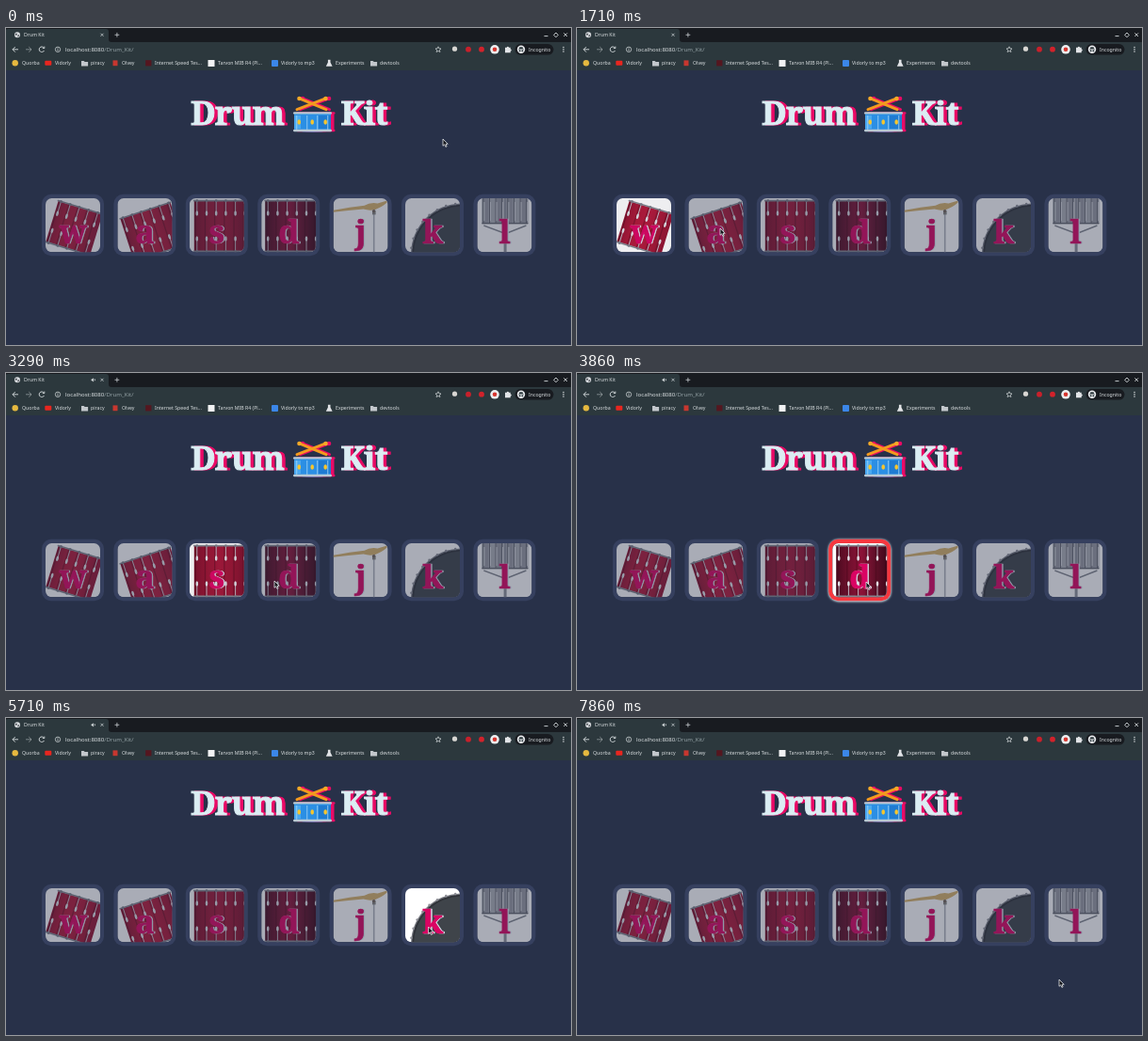
Animation of 600 by 337 pixels, one loop 8 s. Source, as an HTML page:

```html
<!DOCTYPE html>
<html lang="en">
<head>
<meta charset="utf-8">
<title>Drum Kit</title>
<style>
  html, body { margin: 0; width: 100%; height: 100%; overflow: hidden; background: #283149; }
  svg { display: block; width: 100%; height: 100%; }
  .ui { font: 5.2px "Noto Sans", sans-serif; fill: #d9dee0; }
  .slab { font: bold 35px "Noto Serif", serif; stroke-linejoin: miter; }
  .title { letter-spacing: -1px; text-anchor: middle; stroke-width: 1; }
  .key { font-size: 34.5px; text-anchor: middle; stroke-width: .7; }
  .line { fill: none; stroke: #d9dee0; stroke-width: .9; }
</style>
</head>
<body>
<svg id="stage" viewBox="0 0 600 337" xmlns="http://www.w3.org/2000/svg"></svg>
<script>
const LOOP = 8000, STEP = 1000 / 7;
const PITCH = 76.4;
const BAR = '#2c383d', STRIP = '#181b20';
const stage = document.getElementById('stage');

const rect = (x, y, w, h, fill, r = 0, more = '') =>
  `<rect x="${x}" y="${y}" width="${w}" height="${h}" rx="${r}" fill="${fill}" ${more}/>`;
const path = (d, fill, more = '') => `<path d="${d}" fill="${fill}" ${more}/>`;
const line = (d, more = '') => `<path class="line" d="${d}" ${more}/>`;
const dot = (x, y, r, fill) => `<circle cx="${x}" cy="${y}" r="${r}" fill="${fill}"/>`;
const label = (x, y, s, more = '') => `<text class="ui" x="${x}" y="${y}" ${more}>${s}</text>`;
const group = (inner, more = '') => `<g ${more}>${inner}</g>`;
const repeat = (n, fn) => Array.from({ length: n }, (_, i) => fn(i)).join('');

const folder = x => path(`M${x - 3.5} 35h2.7l1 1h3.4v4.4h-7.1z`, '#c3c7cc');
const globe = (x, y) => dot(x, y, 3, '#d9dce0') +
  path(`M${x - 2} ${y - 1.6}l2 .3-.6 1.5-1.6.2zM${x + .5} ${y + .3}l1.6-.4-.5 1.8-1.4.3z`, '#4a4e54');

function browser() {
  const tabs = rect(0, 0, 600, 16, STRIP) +
    path('M0 15V2Q0 1 2 1H106Q109 1 109 4V12Q109 15 112 15z', BAR) +
    globe(12, 7.3) + label(19, 9.2, 'Drum Kit') +
    line('M100.5 5.8l3 3m0-3l-3 3M115.5 7.3h4.8m-2.4-2.4v4.8', 'opacity=".8"') +
    line('M571.5 8.6h4M592.4 5.4l3.6 3.6m0-3.6l-3.6 3.6') +
    line('M584 5l2.4 2.4-2.4 2.4-2.4-2.4z') +
    group(path('M90.6 6.4h1l1.3-1.2v4.2l-1.3-1.2h-1z', '#d9dee0') +
      line('M94 6.3q1 1 0 2', 'stroke-width=".6"'), 'id="sound"');

  const bar = rect(0, 15, 600, 30, BAR) +
    line('M13 22.8H7m2.8-2.8L7 22.8l2.8 2.8') +
    line('M21 22.8h6m-2.8-2.8l2.8 2.8-2.8 2.8', 'opacity=".5"') +
    line('M40.2 21a2.8 2.8 0 1 0 .3 3M40.8 19.6v2h-2') +
    `<circle class="line" cx="55" cy="22.8" r="2.7" style="stroke-width:.7"/>` +
    line('M55 22.5v1.8M55 20.9v.7', 'stroke-width=".7"') +
    `<text class="ui" x="63" y="24.9" style="font-size:6.1px">localhost:8080<tspan fill="#93a0a4">/Drum_Kit/</tspan></text>` +
    path('M459 19.8l.9 2 2.1.2-1.6 1.4.5 2.1-1.9-1.1-1.9 1.1.5-2.1-1.6-1.4 2.1-.2z', 'none',
      'stroke="#d9dee0" stroke-width=".7"') +
    dot(476.5, 22.2, 2.6, '#d8d6d3') + dot(491, 22.7, 2.9, '#c9202b') + dot(505, 22.7, 2.9, '#d3222b') +
    dot(519, 22.8, 4.8, '#eceff1') + dot(519, 22.8, 2.3, '#d6362f') +
    path('M530 20.8h1.8a1.1 1.1 0 0 1 2.2 0h1.7v1.7a1.1 1.1 0 0 1 0 2.2v1.5h-5.7z', '#e2e4e7') +
    rect(540.5, 17, 41, 11.6, STRIP, 5.8) + dot(547, 22.8, 4.2, '#e8eaed') +
    path('M544 22.4h6v.6h-6zM545.4 20.2h3.2l.5 1.8h-4.2z', BAR) +
    dot(545.6, 24.3, 1, BAR) + dot(548.4, 24.3, 1, BAR) +
    label(555, 24.7, 'Incognito') +
    repeat(3, i => dot(592, 20.6 + i * 2.2, .75, '#d9dee0'));

  const marks = [[17, 'Quorba'], [52, 'Vidorly'], [90, 'piracy'], [123, 'Olvey'],
    [158, 'Internet Speed Tes...'], [225, 'Tarvon MIB R4 (Pl...'],
    [292, 'Vidorly to mp3'], [350, 'Experiments'], [397, 'devtools']]
    .map(([x, s]) => label(x, 39.2, s)).join('');
  const icons = dot(9.7, 37.3, 3.2, '#e6b93f') + rect(41.3, 34.8, 7, 5, '#e8261f', 1) +
    folder(83.5) + rect(113.5, 34.4, 5, 5.8, '#c8372f') + rect(148.2, 34.2, 6.2, 6.2, '#55161f') +
    rect(214.5, 34, 7, 7, '#f1f2f3') + rect(282, 34, 7, 7, '#3b86e8', 1) +
    path('M341.9 33.8h2.6v2.6l2.1 4.4h-6.8l2.1-4.4z', '#e2e4e7') + folder(390.5);
  return tabs + bar + marks + icons;
}

// Drum with crossed sticks; a single tint gives its flat shadow.
function drumSign(tint) {
  const c = col => tint || col;
  const stick = (x1, x2) =>
    `<path d="M${x1} 74.8L${x2} 86.6" stroke="${c('#f39a1f')}" stroke-width="3" stroke-linecap="round"/>` +
    dot(x1, 75, 2.3, c('#f7a928'));
  return stick(311.5, 340) + stick(339.5, 309) +
    path('M306 90.5H345V109Q325.5 112 306 109z', c('#2b8fe4')) +
    (tint ? '' : rect(306, 93, 7, 14, '#4aa9f0') + rect(332, 93, 13, 14, '#1f7bd2') +
      repeat(4, i => rect(308.4 + i * 11, 93, .8, 15, '#a9d8f6')) +
      repeat(3, i => `<ellipse cx="${311.2 + i * 14}" cy="100" rx="1.8" ry="2.8" fill="#f7c52d"/>`)) +
    rect(305, 89.2, 41, 2.4, c('#b9c9d4'), 1.2) + rect(305, 107.8, 41, 2.4, c('#b9c9d4'), 1.2);
}

function heading() {
  const words = fill => `<g class="slab title" fill="${fill}" stroke="${fill}">` +
    '<text x="245.5" y="103">Drum</text><text x="380" y="103">Kit</text></g>';
  const pink = '#ea0a66';
  return group(words(pink) + drumSign(pink), 'transform="translate(3.5 0)"') +
    words('#dbedf3') + drumSign();
}

// Shell with rims and tension rods, origin at its upper left corner.
function tom(w, h, fill, place) {
  const gap = 10.2;
  const lug = (x, y, dir) =>
    path(`M${x} ${y}v${dir * 15}`, 'none', 'stroke="#c3c3cc" stroke-width=".9"') +
    `<ellipse cx="${x}" cy="${y + dir * 13.5}" rx="1.3" ry="2.8" fill="#e2e2e8"/>` +
    rect(x - 1.3, y - 1.2, 2.6, 2.6, '#7c7d88', 1);
  return group(
    rect(0, 0, w, h, `url(#${fill})`) +
    rect(-1, -1.2, w + 2, 1.6, '#85868f', .8) + rect(-1, h - .4, w + 2, 1.6, '#85868f', .8) +
    repeat(Math.floor((w - 3) / gap) + 1, i => {
      const x = 3 + i * gap;
      return rect(x - 2.2, 0, 1.3, h, '#3a0815', 0, 'opacity=".35"') + lug(x, -.5, 1) + lug(x, h + .5, -1);
    }),
    `transform="${place}"`);
}

function cymbal() {
  return rect(42.3, 10, 1.6, 48, '#b0b1ba') + rect(41.4, 13.4, 3.6, 4, '#85827e') +
    path('M0 12.8Q18 9.4 33 7.8Q39 4 47 5.4L57 2.4V4.6Q52 9.4 44 12.2Q38 13.4 32 11.6Q16 13 0 14.8z', '#d8b26a') +
    dot(43, 13.6, 1.7, '#75665a');
}

function kick() {
  const cx = 60, cy = 59.5, r = 54;
  const ticks = repeat(9, i => {
    const a = Math.PI * (1.04 + i * .06);
    return dot(cx + r * Math.cos(a), cy + r * Math.sin(a), 1.3, '#8d8e96');
  });
  return dot(cx, cy, r, '#777981') + dot(cx, cy, r - 1.2, '#2f3238') + ticks +
    dot(cx, cy, r - 3, '#3f444a');
}

function rack() {
  const pot = x => rect(x, 0, 23, 27, '#9698a0') + rect(x + 7, 0, 8, 27, '#acaeb5') +
    rect(x, 26, 23, 1.4, '#62646c') +
    repeat(4, i => rect(x + 1 + i * 6.6, 0, .9, 27, '#5c5e66') + rect(x + 2 + i * 6.6, 4, 1, 20, '#d6d7dc'));
  return pot(5) + pot(31) +
    path('M7 29L27 36.5H33L52 29', 'none', 'stroke="#83858e" stroke-width="1.4"') +
    rect(28.2, 0, 3, 58, '#8f9199') + rect(27.2, 34.5, 5, 4, '#6a6c74');
}

const pads = [
  { key: 'w', on: 7, off: 12, hit: 9, art: tom(49, 45, 'red', 'translate(13.5 3) rotate(17)') },
  { key: 'a', on: 12, off: 17, hit: 14, art: tom(56, 47, 'red', 'translate(3 22) rotate(-18)') },
  { key: 's', on: 17, off: 23, hit: 20, art: tom(54, 53, 'crimson', 'translate(5 3)') },
  { key: 'd', on: 23, off: 30, hit: 26, art: tom(54, 53, 'wine', 'translate(4 3)') },
  { key: 'j', on: 31, off: 38, hit: 36, art: cymbal() },
  { key: 'k', on: 39, off: 46, hit: 44, art: kick() },
  { key: 'l', on: 46, off: 52, hit: 48, art: rack() }
];

function padMarkup({ key, art }, i) {
  const letter = (dx, fill) =>
    `<text class="slab key" x="${29.2 + dx}" y="47.6" fill="${fill}" stroke="${fill}">${key}</text>`;
  return group(
    rect(-4.4, -4.2, 66.8, 66.4, '#dbedf3', 10.5, 'class="glow" filter="url(#soft)"') +
    rect(-4, -4.2, 66, 65.4, '#36405f', 10, 'class="frame"') +
    rect(0, 0, 58, 57.2, '#283149', 6.5) +
    group(group(rect(0, 0, 58, 57.2, '#fff') + art, 'clip-path="url(#shape)"') +
      letter(1.2, '#dbedf3') + letter(0, '#da0463'), 'class="face"'),
    `class="pad" transform="translate(${42 + PITCH * i} 181)"`);
}

const shade = (id, stops) => `<linearGradient id="${id}">` +
  stops.map((c, i) => `<stop offset="${i / (stops.length - 1)}" stop-color="${c}"/>`).join('') + '</linearGradient>';

stage.innerHTML = '<defs>' +
  shade('red', ['#931231', '#b01838', '#b6193b', '#a81636', '#931231']) +
  shade('crimson', ['#7d0f2a', '#981433', '#a51638', '#981433', '#7d0f2a']) +
  shade('wine', ['#4b0b20', '#70102d', '#8c1237', '#64102a', '#42091c']) +
  `<clipPath id="shape">${rect(0, 0, 58, 57.2, '#fff', 6.5)}</clipPath>` +
  '<filter id="soft" x="-20%" y="-20%" width="140%" height="140%"><feGaussianBlur stdDeviation=".9"/></filter></defs>' +
  rect(0, 0, 600, 337, '#283149') + browser() + heading() + pads.map(padMarkup).join('') +
  path('M0 0V7.3L1.7 5.8L2.9 8.4L4.1 7.9L3 5.3H5.2z', '#15171c',
    'id="cursor" stroke="#f2f4f6" stroke-width=".75" stroke-linejoin="round"');

const cursor = document.getElementById('cursor');
const sound = document.getElementById('sound');
document.querySelectorAll('.pad').forEach((el, i) => {
  for (const part of ['face', 'frame', 'glow']) pads[i][part] = el.querySelector('.' + part);
});

// Pointer stops: step, x, y
const route = [[0, 464, 118], [1, 460, 120], [7, 80, 214], [11, 80, 215], [12, 152, 213],
  [16, 155, 217], [18, 231, 220], [22, 231, 221], [23, 285, 221], [25, 307, 222],
  [29, 307, 222], [31, 375, 222], [33, 388, 222], [37, 388, 222], [39, 446, 222],
  [42, 456, 222], [45, 456, 222], [46, 501, 219], [48, 528, 222], [51, 530, 222],
  [54, 513, 270], [55, 512, 278]];

function pointerAt(n) {
  const i = Math.max(1, route.findIndex(p => p[0] >= n));
  const [a, b] = [route[i - 1], route[i]];
  const u = (n - a[0]) / (b[0] - a[0]), e = u * u * (3 - 2 * u);
  return [a[1] + (b[1] - a[1]) * e, a[2] + (b[2] - a[2]) * e];
}

function draw(ms) {
  const n = Math.min(55, Math.floor((ms % LOOP + 5) / STEP));
  const [x, y] = pointerAt(n);
  cursor.setAttribute('transform', `translate(${x} ${y})`);
  sound.setAttribute('visibility', n >= 14 ? 'visible' : 'hidden');
  for (const p of pads) {
    const lit = n > p.on && n < p.off ? 1 : n === p.off ? .92 : .6;
    const hit = n === p.hit || n === p.hit + 1;
    p.face.setAttribute('opacity', lit);
    p.frame.setAttribute('fill', hit ? '#f6373f' : '#36405f');
    p.glow.setAttribute('visibility', hit ? 'visible' : 'hidden');
  }
}

const start = performance.now();
function tick() {
  draw(performance.now() - start);
  requestAnimationFrame(tick);
}
tick();
</script>
</body>
</html>
```
